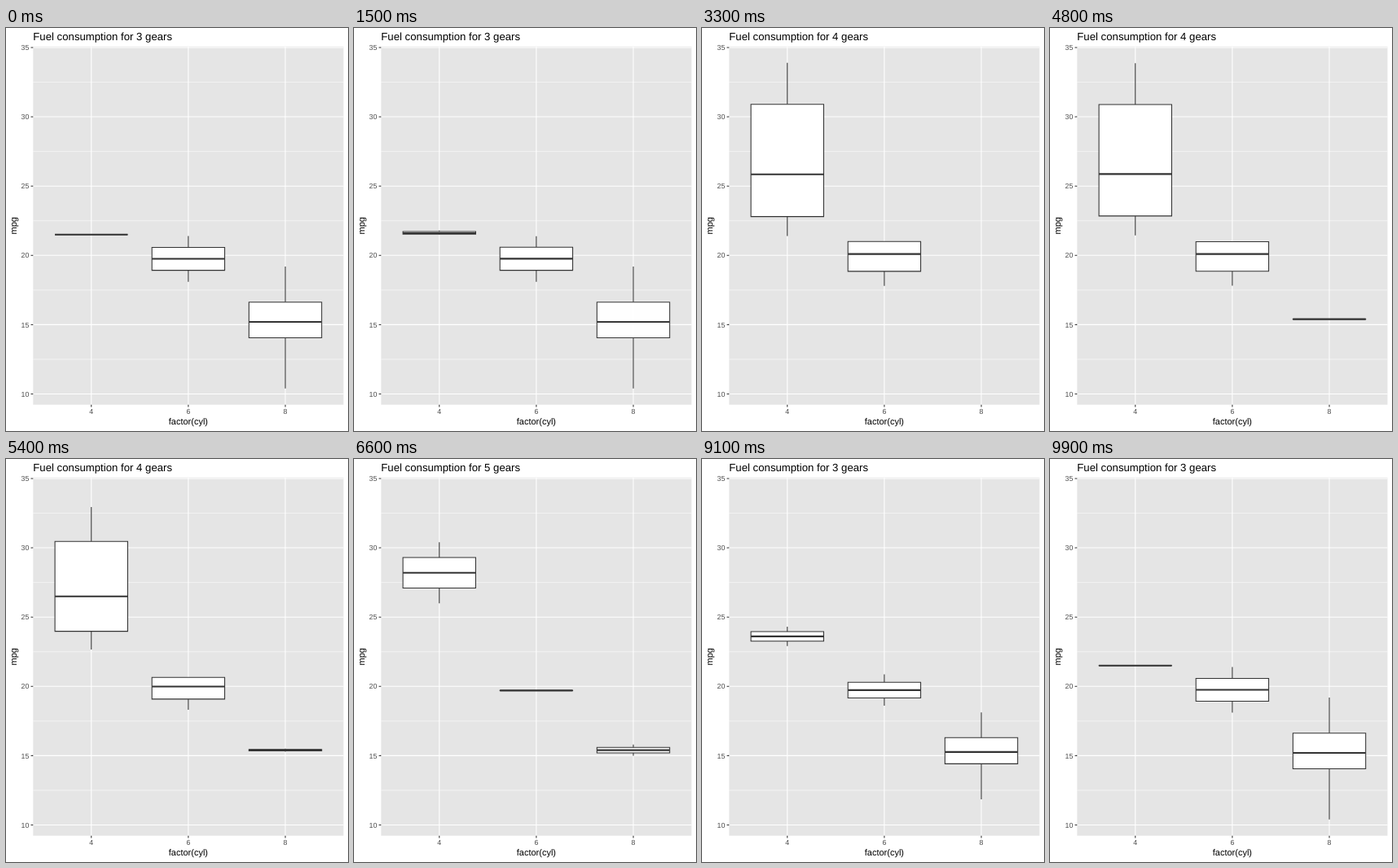
These frames come from a looping animation (420 px wide and 495 px high, 10000 ms). An HTML page:

```html
<!DOCTYPE html>
<html lang="en">
<head>
<meta charset="utf-8">
<title>Fuel consumption</title>
<style>
  html, body { margin: 0; width: 100%; height: 100%; overflow: hidden; background: #fff; }
  svg { display: block; width: 420px; height: 495px; }
  text { font-family: "Liberation Sans", Arial, Helvetica, sans-serif; text-rendering: geometricPrecision; }
</style>
</head>
<body>
<svg id="plot" viewBox="0 0 420 495"></svg>
<script>
const LINE = 1.07, INK = '#333';
const LEFT = 33.3, RIGHT = 414.5, TOP = 22.7, BOTTOM = 462.7;
const STEP = (RIGHT - LEFT) / 3.2;
const HALF = STEP * 0.375;
const xAt = i => LEFT + STEP * (i + 0.6);
const yAt = v => TOP + (35.075 - v) * (BOTTOM - TOP) / 25.85;

// Per gear: one [min, q1, median, q3, max] for each cylinder count
const states = [
  { gear: 3, boxes: [[21.5, 21.5, 21.5, 21.5, 21.5], [18.1, 18.925, 19.75, 20.575, 21.4], [10.4, 14.05, 15.2, 16.625, 19.2]] },
  { gear: 4, boxes: [[21.4, 22.8, 25.85, 30.9, 33.9], [17.8, 18.85, 20.1, 21, 21], null] },
  { gear: 5, boxes: [[26, 27.1, 28.2, 29.3, 30.4], [19.7, 19.7, 19.7, 19.7, 19.7], [15, 15.2, 15.4, 15.6, 15.8]] }
];
// Start and end of each transition, in ticks of 100 ms
const moves = [[11, 33], [45, 67], [79, 100]];
const TICK = 100, LOOP = 10000;

const svg = document.getElementById('plot');

function add(tag, attrs, parent = svg) {
  const el = document.createElementNS('http://www.w3.org/2000/svg', tag);
  for (const k in attrs) el.setAttribute(k, attrs[k]);
  return parent.appendChild(el);
}

function line(x1, y1, x2, y2, stroke, width) {
  add('line', { x1, y1, x2, y2, stroke, 'stroke-width': width });
}

function label(str, x, y, size, anchor, fill = '#000', extra = {}) {
  const el = add('text', { x, y, 'font-size': size, 'text-anchor': anchor, fill, ...extra });
  el.textContent = str;
  return el;
}

add('rect', { x: LEFT, y: TOP, width: RIGHT - LEFT, height: BOTTOM - TOP, fill: '#e5e5e5' });
for (let v = 12.5; v < 35; v += 5) line(LEFT, yAt(v), RIGHT, yAt(v), '#fff', LINE / 2);
for (let v = 10; v <= 35; v += 5) {
  const y = yAt(v);
  line(LEFT, y, RIGHT, y, '#fff', LINE);
  line(LEFT - 2.75, y, LEFT, y, INK, LINE);
  label(v, LEFT - 4.95, y + 3.15, 8.8, 'end', '#4d4d4d');
}
[4, 6, 8].forEach((cyl, i) => {
  const x = xAt(i);
  line(x, TOP, x, BOTTOM, '#fff', LINE);
  line(x, BOTTOM, x, BOTTOM + 2.75, INK, LINE);
  label(cyl, x, BOTTOM + 11.25, 8.8, 'middle', '#4d4d4d');
});
const midX = (LEFT + RIGHT) / 2, midY = (TOP + BOTTOM) / 2;
label('factor(cyl)', midX, 487.1, 11, 'middle');
label('mpg', 13.4, midY, 11, 'middle', '#000', { transform: `rotate(-90 13.4 ${midY})` });
const title = label('', LEFT, 15, 13.2, 'start');

const marks = [0, 1, 2].map(() => {
  const g = add('g', { stroke: INK, 'stroke-width': LINE, fill: '#fff' });
  return {
    g,
    whiskers: add('path', {}, g),
    box: add('path', {}, g),
    median: add('path', { 'stroke-width': LINE * 2 }, g)
  };
});

const ease = p => p < 0.5 ? 4 * p ** 3 : 1 - 4 * (1 - p) ** 3;
const mix = (a, b, e) => a.map((v, i) => v + (b[i] - v) * e);

function drawBox(mark, i, stats, alpha) {
  mark.g.setAttribute('display', stats ? 'inline' : 'none');
  if (!stats) return;
  const [min, q1, med, q3, max] = stats.map(yAt);
  const x = xAt(i), l = x - HALF, r = x + HALF;
  mark.whiskers.setAttribute('d', (max < q3 ? `M${x} ${q3}V${max}` : '') + (min > q1 ? `M${x} ${q1}V${min}` : ''));
  mark.box.setAttribute('d', `M${l} ${q3}H${r}V${q1}H${l}Z`);
  mark.median.setAttribute('d', `M${l} ${med}H${r}`);
  mark.g.setAttribute('fill-opacity', alpha);
  mark.g.setAttribute('stroke-opacity', alpha);
}

function render(ms) {
  const tick = Math.floor((ms % LOOP) / TICK);
  let from = 0, p = 0;
  moves.forEach(([a, b], k) => {
    if (tick >= a) {
      from = k;
      p = Math.min(1, (tick - a) / (b - a));
    }
  });
  const a = states[from], b = states[(from + 1) % 3], e = ease(p);
  title.textContent = `Fuel consumption for ${(p < 0.5 ? a : b).gear} gears`;
  marks.forEach((mark, i) => {
    const s = a.boxes[i], t = b.boxes[i];
    let stats = null, alpha = 1;
    if (s && t) stats = mix(s, t, e);
    else if (s && p < 1) { // leaves by fading
      stats = s;
      alpha = 1 - e;
    } else if (t && p > 0) { // enters by growing from its middle
      stats = mix(t.map(() => (t[0] + t[4]) / 2), t, e);
    }
    drawBox(mark, i, stats, alpha);
  });
}

function loop(now) {
  render(now);
  requestAnimationFrame(loop);
}
render(0);
requestAnimationFrame(loop);
</script>
</body>
</html>
```
